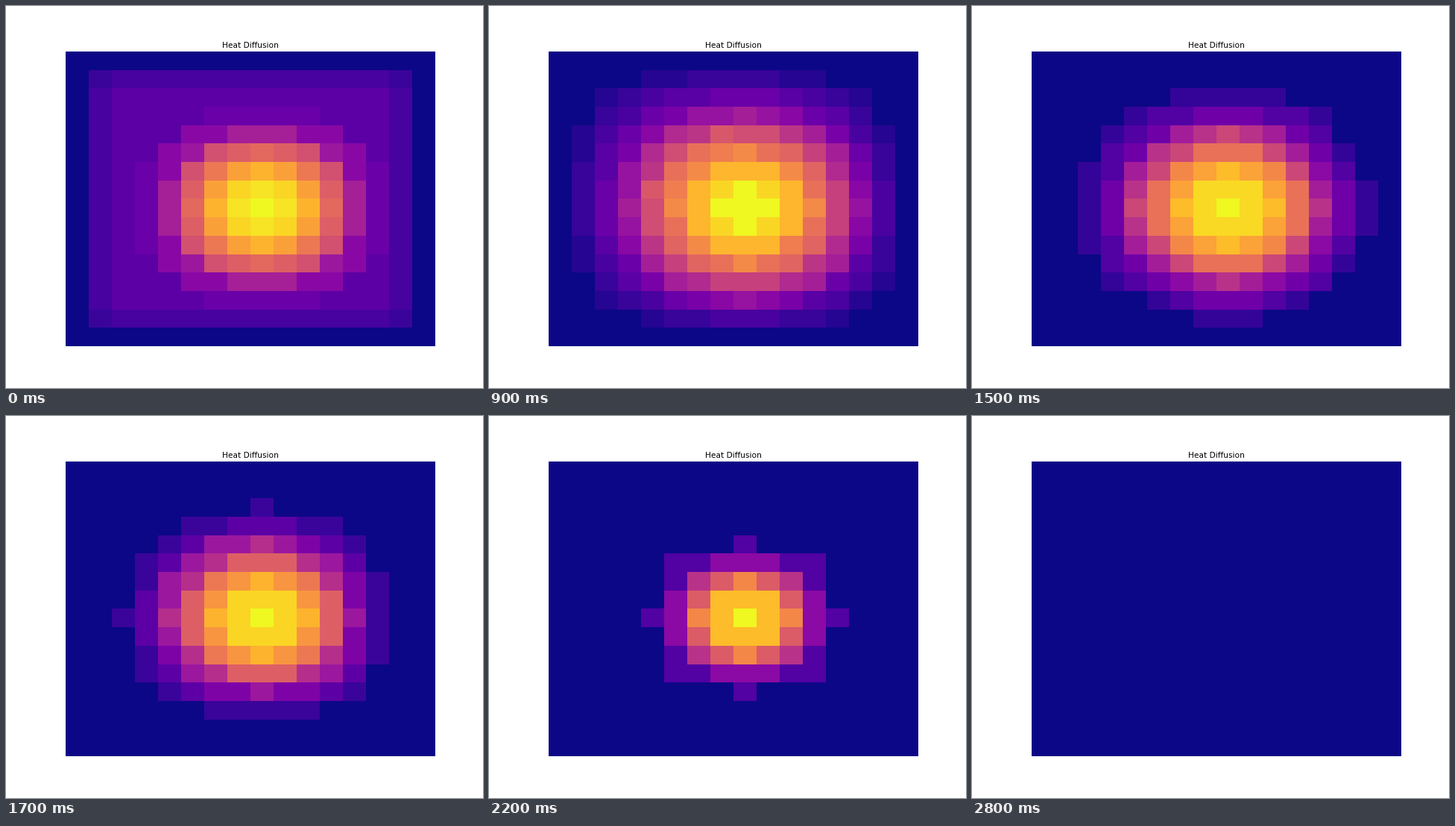
Write a matplotlib script that moves like this. It is 640 px wide and 512 px high and loops after 3.6 s.

```python
import numpy as np
import matplotlib.pyplot as plt
from matplotlib.animation import FuncAnimation

SIZE = 16
CENTER = 8
FRAMES = 36
COLD_FRAME = 28  # the plate has fully cooled from here on

# (half length, half width, heat) of the nested crosses, coolest first
LAYERS = [(4, 2, 20), (3, 3, 30), (3, 1, 40), (2, 2, 40), (2, 1, 50), (1, 1, 60)]


def span(half):
    return slice(CENTER - half, CENTER + half + 1)


def start_plate():
    plate = np.zeros((SIZE, SIZE), dtype=int)
    plate[1:-1, 1:-1] = 10
    for length, width, heat in LAYERS:
        plate[span(length), span(width)] = heat
        plate[span(width), span(length)] = heat
    return plate


def diffuse(plate):
    """Average the four neighbours, rounded down; the border stays cold."""
    out = np.zeros_like(plate)
    out[1:-1, 1:-1] = (plate[:-2, 1:-1] + plate[2:, 1:-1]
                       + plate[1:-1, :-2] + plate[1:-1, 2:]) // 4
    return out


history = [diffuse(start_plate())]
while history[-1].any():
    history.append(diffuse(history[-1]))
cold_step = len(history) - 1

fig, ax = plt.subplots(figsize=(10, 8), dpi=64)
fig.subplots_adjust(left=0.125, right=0.9, bottom=0.11, top=0.88)
fig.patch.set_facecolor("white")
ax.set_title("Heat Diffusion", fontsize=12, fontfamily="DejaVu Sans")
ax.axis("off")
image = ax.imshow(history[0], cmap="plasma", aspect="auto", interpolation="nearest")


def update(frame):
    step = min(frame * cold_step // COLD_FRAME, cold_step)
    plate = history[step]
    image.set_data(plate)
    image.set_clim(0, max(plate.max(), 1))
    return [image]


anim = FuncAnimation(fig, update, frames=FRAMES, interval=100, repeat=True)
plt.show()
```
